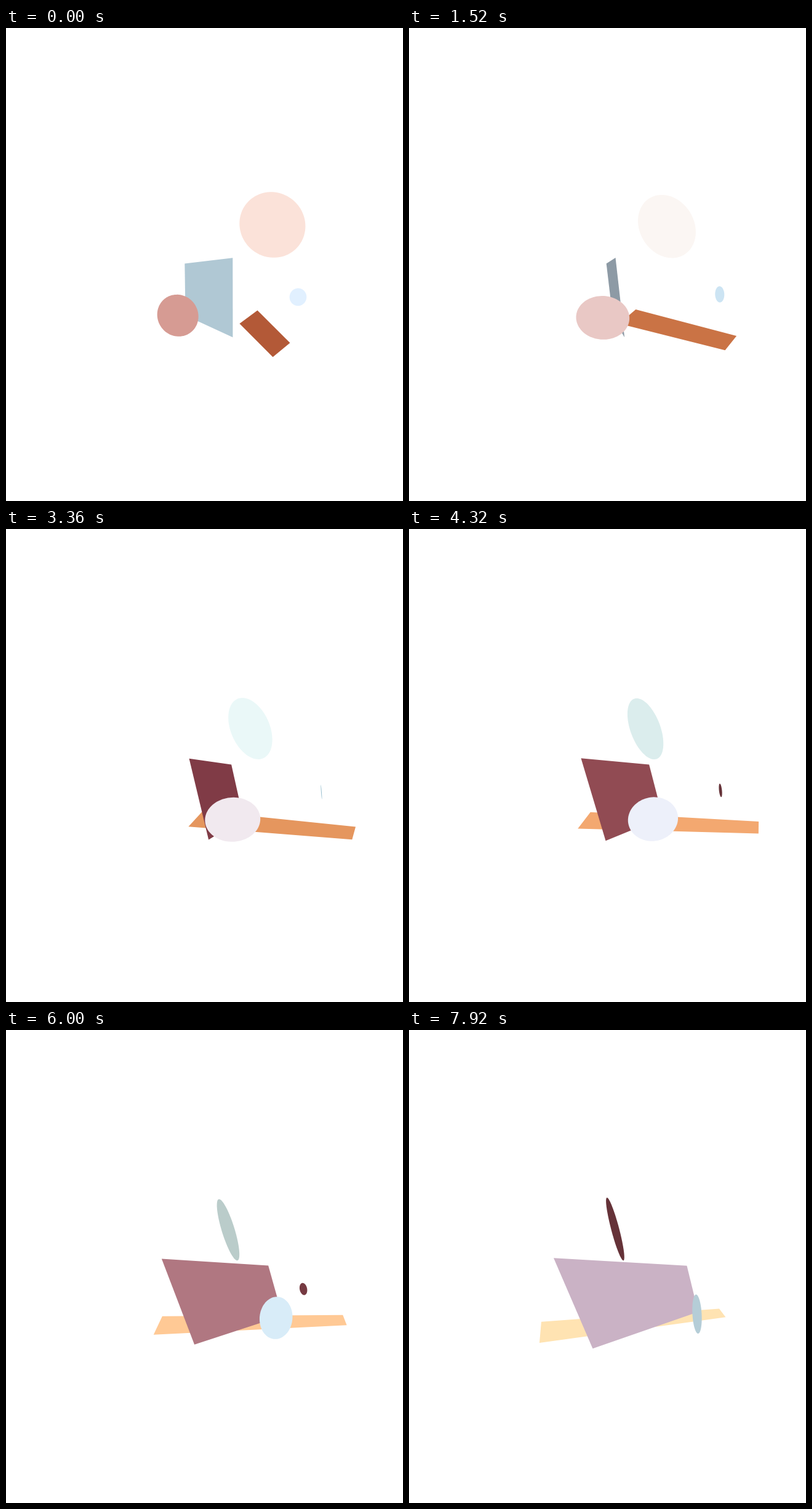
An HTML page with a canvas that plays this animation: 645 by 768 pixels, repeating every 8 s.

```html
<!DOCTYPE html>
<html lang="en">
<head>
<meta charset="utf-8">
<title>Orbiting shapes</title>
<style>
html, body { margin: 0; width: 100%; height: 100%; overflow: hidden; background: #fff; }
canvas { display: block; width: 645px; height: 768px; }
</style>
</head>
<body>
<canvas id="stage" width="645" height="768"></canvas>
<script>
// Flat shapes turn around a vertical axis, one degree per step, seen in perspective.
const LOOP = 8000, STEP = 80, END = 7.92;
const FOCUS = 500, CENTER = { x: 361, y: 384 };
const RAD = Math.PI / 180;
const ctx = document.getElementById('stage').getContext('2d');

// Outline of an ellipse in space; turn and tilt give its direction in degrees.
function disc([x, y, z], rx, ry, turn, tilt) {
  const st = Math.sin(turn * RAD), ct = Math.cos(turn * RAD);
  const se = Math.sin(tilt * RAD), ce = Math.cos(tilt * RAD);
  return Array.from({ length: 90 }, (_, i) => {
    const u = rx * Math.cos(i * 4 * RAD), v = ry * Math.sin(i * 4 * RAD);
    return [x + u * ct + v * st * se, y + v * ce, z - u * st + v * ct * se];
  });
}

// Painted in this order. Colours run evenly from the start to the flip (front)
// and from the flip to the end (back); flip is in seconds.
const shapes = [
  { // small disc
    points: disc([87.2, 40.5, 116.6], 14, 10.9, 29.7, 4.5),
    flip: 3.4,
    front: 'e1f0ff d4eaf8 bed8e8 93bccd',
    back: '653238 653238 7d3d46 9b4e56'
  },
  { // pale disc
    points: disc([74.5, -68.5, -18.8], 55.5, 59.5, 0, 15.5),
    flip: 7.4,
    front: 'fbe2d9 fcf4f0 f6fdfc e6f6f6 d1e5e4 b6c8c6 9aa8a6',
    back: '653238'
  },
  { // orange plank
    points: [[23.9, 124.2, -147.3], [61.7, 96.6, -149.2], [64, 81.1, 181.4], [45.6, 94.5, 185.6]],
    flip: END,
    front: 'b35937 c76f43 db8852 eea168 ffbb87 ffd4a0 ffe3b2'
  },
  { // large panel
    points: [[-60.3, -1.2, 73.2], [9.1, -13.5, -123.5], [8.4, 132.8, -61.8], [-56.7, 67.5, 92]],
    flip: 1.8,
    front: 'b0c8d4 86929c',
    back: '602f36 7f3b46 9b535a b7838f cab2c5'
  },
  { // rose disc
    points: disc([-69, 68.3, 86], 35.8, 27.7, -31, 5.5),
    flip: END,
    front: 'd69b93 e8c3c0 f0e1e4 f1eff8 e3f4fe cfe6f3 b5cdd7'
  }
];

function project([x, y, z], angle) {
  const s = Math.sin(angle), c = Math.cos(angle);
  const scale = FOCUS / (FOCUS - z * c + x * s);
  return [CENTER.x + (x * c + z * s) * scale, CENTER.y + y * scale];
}

// Colour at position f (0 to 1) along a row of evenly spaced stops.
function ramp(row, f) {
  const stops = row.split(' ');
  const pos = Math.min(1, Math.max(0, f)) * (stops.length - 1);
  const i = Math.floor(pos), j = Math.min(i + 1, stops.length - 1);
  const rgb = [0, 2, 4].map(k => {
    const a = parseInt(stops[i].slice(k, k + 2), 16);
    const b = parseInt(stops[j].slice(k, k + 2), 16);
    return Math.round(a + (b - a) * (pos - i));
  });
  return `rgb(${rgb})`;
}

function draw({ points, flip, front, back }, t, angle) {
  const pts = points.map(p => project(p, angle));
  let area = 0;
  ctx.beginPath();
  pts.forEach(([x, y], i) => {
    const [nx, ny] = pts[(i + 1) % pts.length];
    area += x * ny - nx * y;
    ctx.lineTo(x, y);
  });
  ctx.closePath();
  ctx.fillStyle = area > 0 || !back
    ? ramp(front, t / flip)
    : ramp(back, (t - flip) / (END - flip));
  ctx.fill();
}

const start = performance.now();

function frame() {
  const step = Math.floor((performance.now() - start) % LOOP / STEP);
  ctx.clearRect(0, 0, 645, 768);
  for (const shape of shapes) draw(shape, step * STEP / 1000, step * RAD);
  requestAnimationFrame(frame);
}

frame();
</script>
</body>
</html>
```
